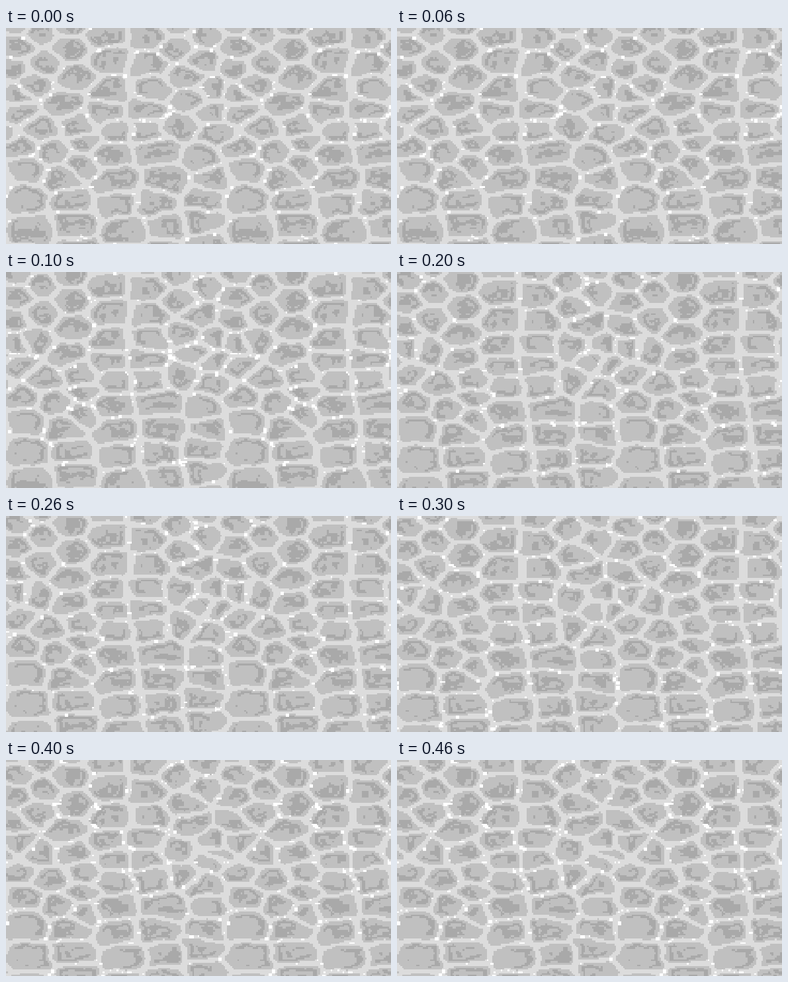
Animation of 582 by 328 pixels, one loop 500 ms. Source, as an HTML page with a canvas:

```html
<!DOCTYPE html>
<html>
<head>
<meta charset="utf-8">
<title>Water</title>
<style>
html, body { margin: 0; width: 100%; height: 100%; overflow: hidden; background: #c0c0c0; }
canvas { display: block; width: 582px; height: 328px; }
</style>
</head>
<body>
<canvas id="stage" width="582" height="328"></canvas>
<script>
const TILE = 334, GRID = 128, PX = TILE / GRID, ROWS = 126;
const STEP = 100, EASE = [0, 0.27, 0.52, 0.67, 0.82];
const STRETCH = 1.45, ROUND = 2.4;
const LINE = 220, FILL = 192, DARK = 169, GLINT = 255;

// Each stream lists x, y stops; every cell drifts to the next stop in one loop.
const streams = [
  [15, -8, 18, 30, 15, 60, 10, 102, 15, 130, 20, 182, 28, 215, 28, 258, 35, 308, 30, 352],
  [52, 8, 58, 55, 42, 85, 52, 155, 70, 188, 85, 228, 103, 262, 105, 297, 110, 340],
  [95, -5, 95, 32, 105, 75, 88, 115, 110, 148, 122, 176, 115, 207, 118, 238],
  [150, 10, 158, 48, 157, 95, 150, 130, 165, 158, 155, 190, 162, 232, 165, 268, 180, 308, 175, 350],
  [220, 12, 215, 55, 222, 92, 210, 125, 215, 157, 230, 183, 246, 232, 227, 267, 245, 300, 242, 342],
  [258, -8, 258, 28, 275, 75, 258, 150, 265, 180],
  [300, 12, 300, 50, 280, 108, 320, 160, 297, 198, 312, 228, 298, 262, 292, 293, 300, 332],
  [315, 95, 315, 128, 318, 150]
];

const hash = (x, y) => {
  let h = Math.imul(x | 0, 374761393) ^ Math.imul(y | 0, 668265263);
  h = Math.imul(h ^ (h >>> 13), 1274126177);
  return ((h ^ (h >>> 16)) >>> 0) / 4294967296;
};
const mix = (a, b, t) => a + (b - a) * t;
const smooth = t => t * t * (3 - 2 * t);

function noise(x, y, wrap = 1 << 20) {
  const i = Math.floor(x), j = Math.floor(y), u = smooth(x - i), v = smooth(y - j);
  const at = (a, b) => hash(((a % wrap) + wrap) % wrap, b + 50);
  return mix(mix(at(i, j), at(i + 1, j), u), mix(at(i, j + 1), at(i + 1, j + 1), u), v) * 2 - 1;
}

function cellsAt(p) {
  const cells = [];
  streams.forEach((s, row) => {
    const count = s.length / 2;
    for (let k = -1; k < count; k++) {
      const enters = k < 0, leaves = k === count - 1;
      const edge = enters ? s[1] : s[s.length - 1];
      // Streams that begin or end off stage run on past the edge.
      if ((enters && edge > 20) || (leaves && edge < 320)) continue;
      const a = Math.max(k, 0) * 2, b = Math.min(k + 1, count - 1) * 2;
      const y0 = enters ? edge - 38 : s[a + 1], y1 = leaves ? edge + 38 : s[b + 1];
      cells.push({ x: mix(s[a], s[b], p), y: mix(y0, y1, p), id: row * 20 + k + 2 });
    }
  });
  return cells;
}

const wrapX = d => d - TILE * Math.round(d / TILE);

function shade(x, y, cells, drift) {
  const wx = x + 4 * noise(x / TILE * 24, (y - drift) / 14, 24);
  const wy = y + 3 * noise(x / TILE * 24, (y - drift) / 14 + 40, 24);
  const near = [];
  let best = null;
  for (const c of cells) {
    const dx = wrapX(c.x - wx), dy = (c.y - wy) * STRETCH;
    const d = dx * dx + dy * dy;
    if (d > 14400) continue;
    const n = { dx, dy, d, id: c.id };
    near.push(n);
    if (!best || d < best.d) best = n;
  }
  if (!best) return { depth: 0, tone: FILL };
  let sum = 0;
  for (const n of near) {
    if (n === best) continue;
    const gap = Math.hypot(n.dx - best.dx, n.dy - best.dy) || 1;
    sum += Math.exp(-(n.d - best.d) / (2 * gap) / ROUND);
  }
  const depth = -ROUND * Math.log(sum);
  if (depth < 4.3) return { depth, tone: LINE };

  // Dark curls follow the cell outline for part of the way round.
  const id = best.id, lx = -best.dx, ly = -best.dy;
  const grain = noise(lx / 9 + id * 7, ly / 9 + id * 3);
  const turn = Math.cos(Math.atan2(ly, lx) - hash(id, 9) * 6.28);
  const ring = Math.abs(depth - 12.2 - grain * 2.5) < 2.7 && turn + grain * 0.7 > -0.15;
  const core = depth > 16.5 && grain + hash(id, 4) > 0.75;
  return { depth, tone: ring || core ? DARK : FILL };
}

function paint(step) {
  const tile = document.createElement("canvas");
  tile.width = GRID;
  tile.height = ROWS;
  const g = tile.getContext("2d"), img = g.createImageData(GRID, ROWS);
  const cells = cellsAt(EASE[step]), depths = [];
  const put = (i, j, tone) => {
    if (j < ROWS) img.data.set([tone, tone, tone, 255], (j * GRID + i % GRID) * 4);
  };
  for (let j = 0; j < ROWS; j++) {
    for (let i = 0; i < GRID; i++) {
      const s = shade((i + 0.5) * PX, (j + 0.5) * PX, cells, EASE[step] * 42);
      depths.push(s.depth);
      put(i, j, s.tone);
    }
  }
  // Glints gather in patches along the bright lines.
  for (let n = 0; n < 620; n++) {
    const i = Math.floor(hash(n, step * 31 + 1) * GRID);
    const j = Math.floor(hash(n, step * 31 + 2) * ROWS);
    if (depths[j * GRID + i] > 4.3) continue;
    if (noise(i / 8, j / 8 + 90, 16) + hash(n, 3) < 0.35) continue;
    const size = hash(n, step + 70);
    const w = size > 0.9 ? 3 : size > 0.5 ? 2 : 1, h = size > 0.6 && size < 0.85 ? 2 : 1;
    for (let a = 0; a < w; a++) for (let b = 0; b < h; b++) put(i + a, j + b, GLINT);
  }
  g.putImageData(img, 0, 0);
  return tile;
}

const ctx = document.getElementById("stage").getContext("2d");
ctx.imageSmoothingEnabled = false;
const tiles = EASE.map((_, step) => paint(step));
const start = performance.now();
let shown = -1;

function draw(now) {
  const step = Math.floor(Math.max(0, now - start) / STEP) % tiles.length;
  if (step !== shown) {
    shown = step;
    for (let x = 0; x < 582; x += TILE) ctx.drawImage(tiles[step], x, 0, TILE, ROWS * PX);
  }
  requestAnimationFrame(draw);
}
draw(start);
</script>
</body>
</html>
```
